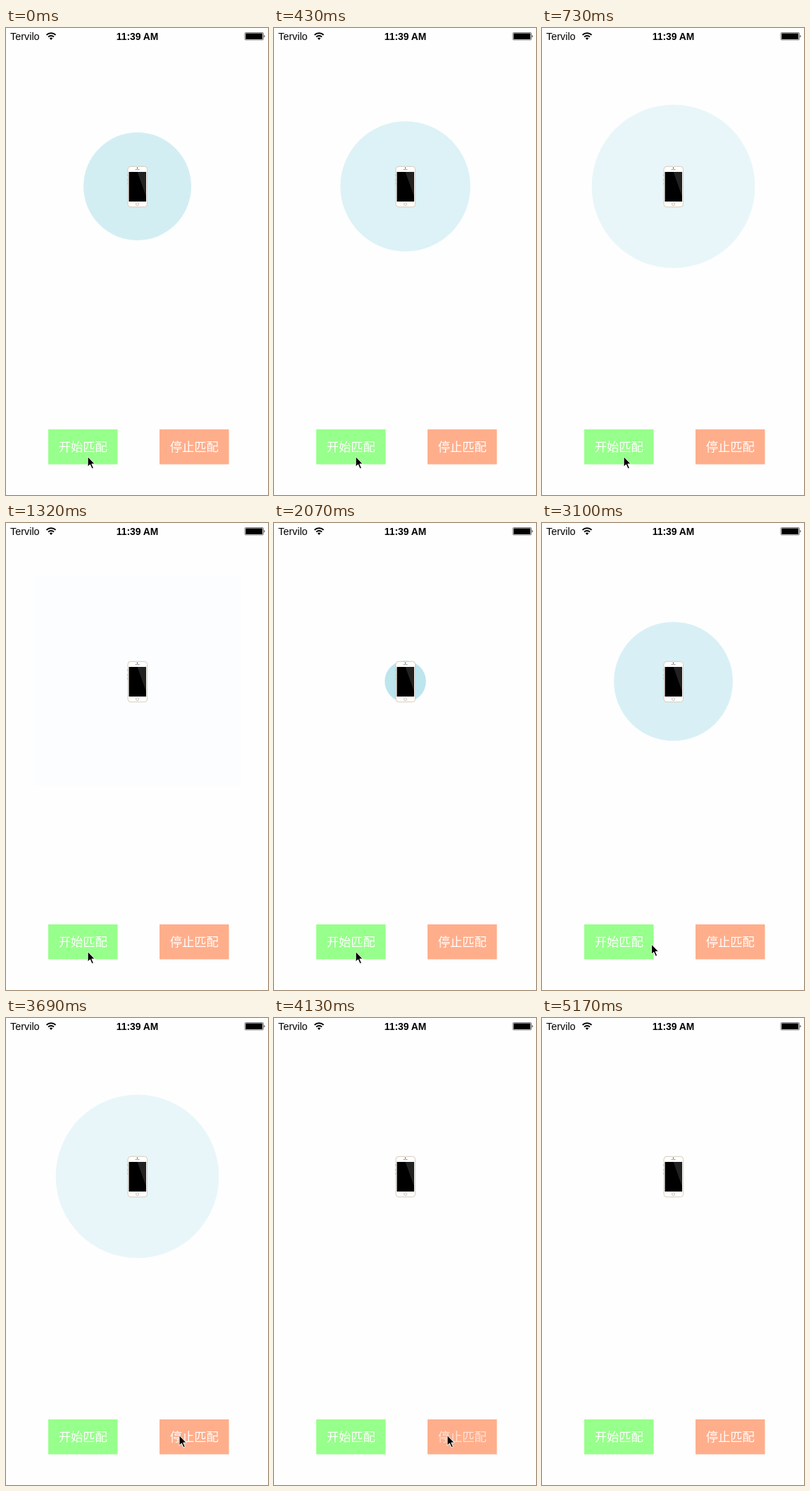
Recreate the animation shown at these times as an HTML page. Size 372x662 px, loop 5.87 s.

```html
<!DOCTYPE html>
<html lang="zh">
<head>
<meta charset="utf-8">
<title>匹配</title>
<style>
  html, body { margin: 0; height: 100%; overflow: hidden; background: #fefefe; }
  svg { display: block; width: 100%; height: 100%; }
  .status { font-family: "Liberation Sans", Arial, sans-serif; }
  .label { font: 300 17.3px "Noto Sans CJK SC", "Noto Sans CJK", sans-serif; fill: #fff; text-anchor: middle; }
</style>
</head>
<body>
<svg viewBox="0 0 372 662">
  <g class="status">
    <text x="6" y="16.8" font-size="14.4">Tervilo</text>
    <text x="186.5" y="16.8" font-size="13.8" font-weight="bold" text-anchor="middle">11:39 AM</text>
  </g>
  <g fill="none" stroke="#000" stroke-width="2">
    <path d="M57.5 9.9a9.2 9.2 0 0 1 13 0M60 12.6a5.7 5.7 0 0 1 8 0"/>
    <path d="M64 17l-2.2-2.4a3.2 3.2 0 0 1 4.4 0z" fill="#000" stroke="none"/>
  </g>
  <rect x="339" y="6.5" width="26.5" height="10.5" rx="1.5" fill="#fff" stroke="#000" stroke-width=".5"/>
  <rect x="340.2" y="7.5" width="24" height="8.5" rx=".5"/>
  <path d="M366.5 10q2 1.7 0 3.5z"/>

  <rect id="haze" x="39.5" y="77" width="295.5" height="296" fill="#fcfdff"/>
  <circle id="pulse" cx="186.5" cy="224.5" fill="#afe0ea"/>

  <g id="phone">
    <rect x="173" y="196.3" width="27.5" height="57.4" rx="4" fill="#fff" stroke="#cfbfa8" stroke-width=".8"/>
    <path d="M172.6 207v3m0 4v3m0 2v3" stroke="#cfbfa8"/>
    <rect x="174.5" y="204" width="24.5" height="42"/>
    <path d="M186.5 204H199v35z" fill="#222"/>
    <circle cx="186.5" cy="198.4" r=".7"/>
    <path d="M183.5 200.7h6" stroke="#777" stroke-width=".8"/>
    <circle cx="186.5" cy="249.6" r="2" fill="#fff" stroke="#bbb0a0" stroke-width=".8"/>
  </g>

  <rect x="60" y="569" width="98.5" height="49.5" fill="#97ff8b"/>
  <text class="label" x="109.3" y="600.4">开始匹配</text>
  <rect x="218" y="569" width="98.5" height="49.5" fill="#ffae8b"/>
  <text class="label" id="stop" x="267.3" y="600.4">停止匹配</text>

  <path id="cursor" d="M1 .5V15L4.4 11.9 7 17.8 9.3 16.8 6.8 11H11.2Z" stroke="#fff"/>
</svg>
<script>
const LOOP = 5870, STEP = 147.7, LEAD = 10; // the picture advances in even steps
const PERIOD = 20, GROWTH = 7.87, MAX_RADIUS = 116; // pulse, in steps and pixels
const PRESS = 27, RELEASE = 29, GONE = 35;

const [haze, pulse, stop, cursor] = ['haze', 'pulse', 'stop', 'cursor'].map(id => document.getElementById(id));
const show = (el, on) => el.setAttribute('visibility', on ? 'visible' : 'hidden');
const progress = (step, from, to) => Math.min(1, Math.max(0, (step - from) / (to - from)));
const smooth = k => k * k * (3 - 2 * k);

// Sweep from the left button to the right one, then slide off below.
function pointerAt(step) {
  const sweep = smooth(progress(step, 18.7, 25));
  const leave = progress(step, 31, 34);
  return [115 + 130 * sweep - 92 * leave, 607 - 16 * (1 - (1 - sweep) ** 3) + 18 * leave];
}

function draw(time) {
  const step = Math.floor((time % LOOP + LEAD) / STEP);
  const resting = step >= 9 && step < 13;
  const age = step < 9 ? step : step - PERIOD;
  const radius = Math.min(MAX_RADIUS, 76.5 + GROWTH * age);

  show(haze, resting);
  show(pulse, !resting && step <= PRESS);
  pulse.setAttribute('r', Math.max(0, radius));
  pulse.setAttribute('opacity', 1 - radius / 163);
  stop.setAttribute('opacity', step < PRESS ? 1 : 0.3 + 0.7 * progress(step, PRESS, RELEASE));
  show(cursor, step < GONE);
  cursor.setAttribute('transform', `translate(${pointerAt(step)})`);
}

const start = performance.now();
function frame() {
  draw(performance.now() - start);
  requestAnimationFrame(frame);
}
frame();
</script>
</body>
</html>
```
